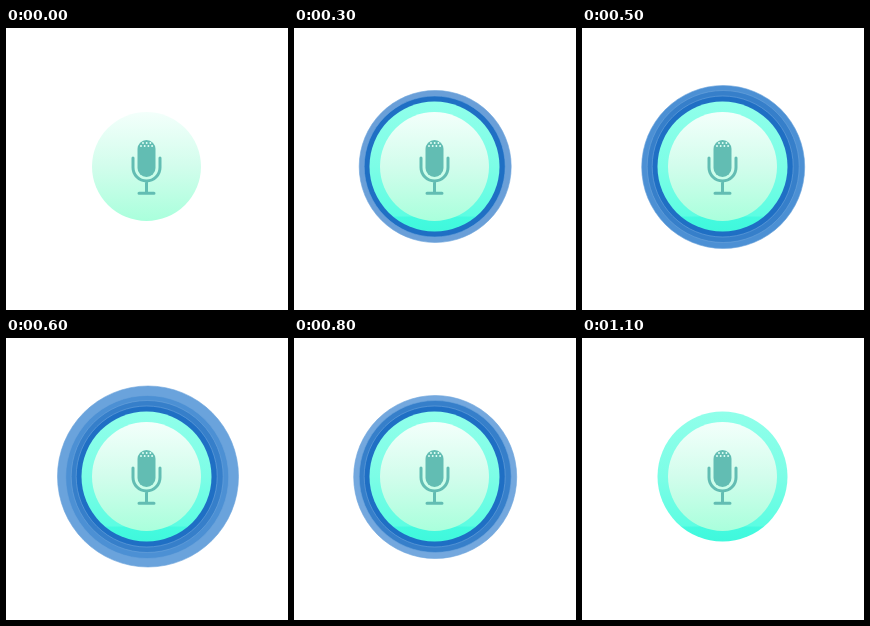
These frames come from a looping animation (282 by 282 pixels, 1.2 s). An HTML page:

```html
<!DOCTYPE html>
<html lang="en">
<head>
<meta charset="utf-8">
<title>Microphone pulse</title>
<style>
  html, body { margin: 0; width: 100%; height: 100%; overflow: hidden; background: #fff; }
  svg { display: block; width: 100vw; height: 100vh; }
</style>
</head>
<body>
<svg viewBox="0 0 282 282">
  <defs>
    <linearGradient id="disc" x2="0" y2="1">
      <stop stop-color="#f3fffb"/>
      <stop offset=".5" stop-color="#d2fdec"/>
      <stop offset="1" stop-color="#a9ffdc"/>
    </linearGradient>
    <linearGradient id="rim" x2="0" y2="1">
      <stop stop-color="#90ffea"/>
      <stop offset=".5" stop-color="#7cfde6"/>
      <stop offset=".88" stop-color="#5cfde2"/>
      <stop offset=".89" stop-color="#44fadf"/>
      <stop offset="1" stop-color="#40f8dc"/>
    </linearGradient>
  </defs>
  <g id="rings"></g>
  <circle id="edge" cx="140.5" cy="138.5" r="65" fill="url(#rim)"/>
  <circle cx="140.5" cy="138.5" r="54.5" fill="url(#disc)"/>
  <rect x="131.5" y="112" width="18" height="37" rx="9" fill="#62bdb3"/>
  <g fill="none" stroke="#62bdb3" stroke-width="3" stroke-linecap="round">
    <path d="M127 130v9.5a13.5 13.5 0 0 0 27 0V130M140.5 153.500v11M133 165.200h15"/>
  </g>
  <path d="M137 115h0m3.700 0h0m3.700 0h0M135 118h0m3.700 0h0m3.700 0h0m3.700 0h0"
        stroke="#e4fff6" stroke-width="1.900" stroke-linecap="round"/>
</svg>
<script>
const STEP = 100, PEAK = 6;
// Outermost first; each ring appears at a step and may deepen one step later.
const rings = [
  { x: 142, y: 138.5, r: 90.5, from: 6, fresh: '#6aa3dc', deep: '#6aa3dc' },
  { x: 141.2, y: 139, r: 81.5, from: 4, fresh: '#74a8de', deep: '#4c90d4' },
  { x: 141.2, y: 138.5, r: 76, from: 3, fresh: '#6a9fd8', deep: '#367fca' },
  { x: 140.7, y: 138.5, r: 70.5, from: 2, fresh: '#1f6fc4', deep: '#1f6fc4' }
];
const group = document.getElementById('rings');
const edge = document.getElementById('edge');

for (const ring of rings) {
  ring.node = document.createElementNS(group.namespaceURI, 'circle');
  const attrs = { cx: ring.x, cy: ring.y, r: ring.r, stroke: '#6ea5dc', 'stroke-width': 0.6 };
  for (const key in attrs) ring.node.setAttribute(key, attrs[key]);
  group.append(ring.node);
}

function show(node, visible) {
  node.style.visibility = visible ? 'visible' : 'hidden';
}

function draw() {
  const tick = Math.floor(performance.now() / STEP) % (2 * PEAK);
  const level = PEAK - Math.abs(PEAK - tick);
  show(edge, level > 0);
  for (const ring of rings) {
    show(ring.node, level >= ring.from);
    ring.node.setAttribute('fill', level > ring.from ? ring.deep : ring.fresh);
  }
  requestAnimationFrame(draw);
}
draw();
</script>
</body>
</html>
```
